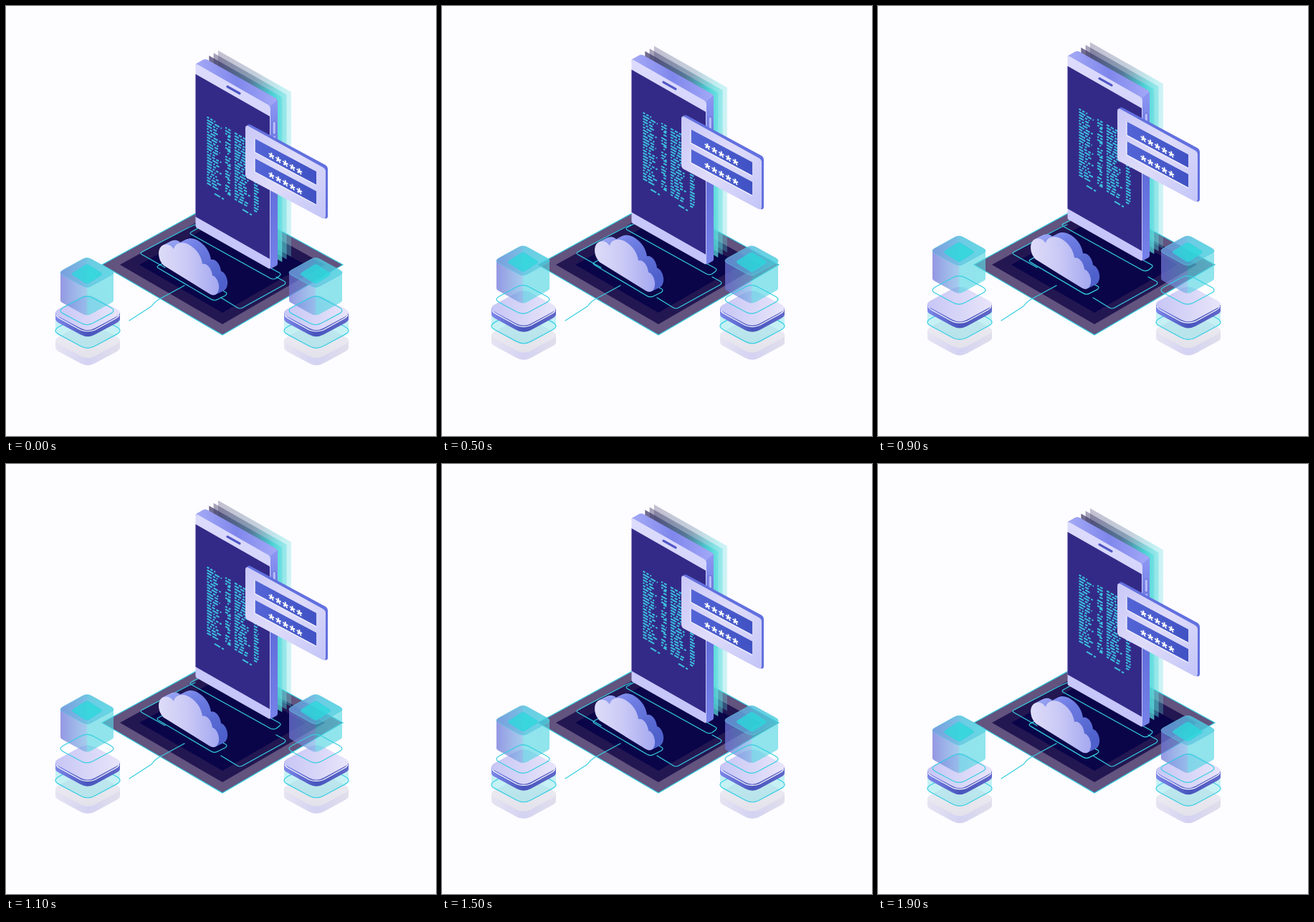
Animation, 600 px wide and 600 px high, one loop 2 s. Source, as an HTML page:

```html
<!DOCTYPE html>
<html lang="en">
<head>
<meta charset="utf-8">
<title>Isometric cloud access</title>
<style>
  html, body { margin: 0; width: 100%; height: 100%; overflow: hidden; background: #fdfcff; }
  svg { display: block; width: 100vw; height: 100vh; }
  .line { fill: none; stroke: #35cfe2; stroke-width: 1.2; stroke-linejoin: round; stroke-linecap: round; }
  .stars { font: bold 21px "Liberation Sans", Arial, sans-serif; letter-spacing: 1.55px; fill: #fff; }
</style>
</head>
<body>
<svg id="stage" viewBox="0 0 600 600" xmlns="http://www.w3.org/2000/svg"></svg>
<script>
const PERIOD = 2000, STEP = 100, LEAD = 25;
const stage = document.getElementById('stage');
const path = (d, attrs) => `<path d="${d}" ${attrs}/>`;
const poly = (points, attrs) => `<polygon points="${points}" ${attrs}/>`;
const lift = (amp, body) => `<g data-lift="${amp}">${body}</g>`;
const gradient = (id, direction, ...stops) =>
  `<linearGradient id="${id}" ${direction}>${stops.map(([at, color, alpha = 1]) =>
    `<stop offset="${at}" stop-color="${color}" stop-opacity="${alpha}"/>`).join('')}</linearGradient>`;
const DOWN = 'x1="0" y1="0" x2="0" y2="1"';
const DIAGONAL = 'x1="0" y1="0" x2="1" y2="1"';

// Rhombus with softened corners, centred on (cx, cy).
function tile(cx, cy, hw, hh, soft = .2) {
  const corners = [[cx, cy - hh], [cx + hw, cy], [cx, cy + hh], [cx - hw, cy]];
  const toward = (a, b) => [a[0] + (b[0] - a[0]) * soft, a[1] + (b[1] - a[1]) * soft];
  return corners.map((corner, i) => {
    const before = toward(corner, corners[(i + 3) % 4]);
    const after = toward(corner, corners[(i + 1) % 4]);
    return `${i ? 'L' : 'M'}${before}Q${corner} ${after}`;
  }).join('') + 'Z';
}

// Silhouette of a tile pulled down by a height.
function block(cx, cy, hw, hh, height, soft = .2) {
  const reach = hw * (1 - soft / 2);
  return tile(cx, cy, hw, hh, soft) + tile(cx, cy + height, hw, hh, soft) +
    `M${cx - reach},${cy}h${2 * reach}v${height}h${-2 * reach}Z`;
}

function seeded(seed) {
  return () => (seed = (seed * 16807) % 2147483647) / 2147483647;
}

function defs() {
  return '<defs>' +
    gradient('bezelTop', '', [0, '#a5aaf6'], [.5, '#7f87ec'], [1, '#a4a9f7']) +
    gradient('bezel', DOWN, [0, '#dddcfd'], [.3, '#d3d3fc'], [1, '#c3c3fa']) +
    gradient('phoneSide', DOWN, [0, '#8f98f3'], [.4, '#5d69d8'], [1, '#7681e8']) +
    gradient('ghost', '', [0, '#3b3163'], [.55, '#40688c'], [.86, '#35d0d2'], [1, '#66dfe0']) +
    gradient('card', DIAGONAL, [0, '#c9c8f8'], [.5, '#dfdcfa'], [1, '#c3c5f8']) +
    gradient('field', '', [0, '#5365d6'], [1, '#4052c3']) +
    gradient('cloudFront', '', [0, '#dddcf8'], [.45, '#cbcaf6'], [1, '#a4a8f0']) +
    gradient('cloudBack', '', [0, '#a3adf5'], [.5, '#7483e7'], [1, '#4d5fca']) +
    gradient('cubeSide', '', [0, '#6f74d8', .74], [.48, '#6fabe2', .62], [.52, '#4bd3e0', .6], [1, '#58d8e2', .66]) +
    gradient('cubeTop', '', [0, '#6c9fdc', .62], [1, '#3fcfdd', .55]) +
    gradient('slabTop', '', [0, '#c7c6f5'], [1, '#e8e5fa']) +
    gradient('slabSide', '', [0, '#7d87ea'], [.5, '#4855bd'], [1, '#6168ca']) +
    gradient('echoSide', '', [0, '#e6e4f2'], [.5, '#d3d2f2'], [1, '#e1dfeb']) +
    gradient('echoTop', DOWN, [0, '#f0eef5'], [1, '#e3e1ea']) +
    '</defs>';
}

function base() {
  return poly('302,269 470,361 302,459 134,361', 'fill="#62537f" stroke="#35cfe2" stroke-width="1.2"') +
    poly('302,282 445,361 302,444 159,361', 'fill="#231752"') +
    poly('302,297 418,361 302,428 186,361', 'fill="#0a0549"') +
    path('M264,305L255,309 190,343Q186,345 190,347L222,365', 'class="line"') +
    path('M300,407L323,421Q326,423 330,421L388,389Q392,386 388,384L377,378', 'class="line"') +
    path('M172,439L203,419Q208,412 214,409L249,390', 'class="line"');
}

function code() {
  const random = seeded(77);
  const slope = .577;
  let d = '';
  const dash = (x, y, length) => d += `M${x},${y}l${length},${length * slope}`;
  const row = (left, right, top) => {
    let x = left;
    while (x < right - 1) {
      const length = Math.min(right - x, 2 + random() * 7);
      dash(x, top + (x - left) * slope, length);
      x += length + 1.8;
    }
  };
  for (let i = 0; i < 24; i++) {
    const y = 155 + i * 4;
    row(280.5, 292 + random() * 9, y);
    row(306 + (i % 5 > 2 ? 3 : 0), 313.5, y + 14.7);
    row(319, 332 + random() * 9, y + 22.2);
    row(346, 352.5, y + 38);
  }
  dash(291, 262, 8); dash(301, 268, 3);
  dash(330, 284, 8); dash(340, 290, 3);
  return path(d, 'fill="none" stroke="#3cbfdd" stroke-width="2"');
}

function phone() {
  const ghosts = [3, 2, 1].map(n => {
    const x = 6.3 * n, y = -3.7 * n;
    return poly(`${277 + x},${73 + y} ${379 + x},${131 + y} ${379 + x},${361 + y} ${277 + x},${303 + y}`,
      `fill="url(#ghost)" opacity="${[0, .72, .45, .3][n]}"`);
  }).join('');
  return path('M270,309L259,315Q255,317 259,319L369,380Q373,382 377,380L381,377Q385,374 381,372L370,366', 'class="line"') +
    ghosts +
    path('M264.500,83Q264.500,80 268,79L275,75Q278,73.500 281,75L377,129Q379,131 379,134L369,141Z', 'fill="url(#bezelTop)"') +
    path('M368,142Q369,138 379,131V359Q379,362 376,363L369,367Z', 'fill="url(#phoneSide)"') +
    path('M264.500,83Q264.500,80 268,82L366,138Q369,140 369,143V365Q369,368 366,366L267,310Q264.500,309 264.500,307Z', 'fill="url(#bezel)"') +
    poly('264.5,95 368,154 368,353 264.5,294', 'fill="#332a87"') +
    path('M309,112.500L326,122', 'fill="none" stroke="#5056c6" stroke-width="3.2" stroke-linecap="round"') +
    path('M374.300,163V177', 'fill="none" stroke="#666fd8" stroke-width="5.500" stroke-linecap="round"') +
    path('M374.300,163V177M374.300,183V184', 'fill="none" stroke="#b5b9fa" stroke-width="3.500" stroke-linecap="round"') +
    code();
}

function card() {
  const field = y => path(`M347,${y}L433,${y + 46}V${y + 65}L347,${y + 19}Z`, 'fill="url(#field)"') +
    path(`M347,${y}V${y + 19}L433,${y + 65}`, 'fill="none" stroke="#f4f2ff" stroke-width="1.3"') +
    `<text class="stars" transform="matrix(1 .56 0 1 366.3 ${y + 32})">*****</text>`;
  return path('M336,167Q338,164 342,166L446,222Q449,224 449,228V293Q449,298 444,296L440,230Z', 'fill="#6270df"') +
    path('M334,171Q334,165 339,168L442,225Q446,227 446,231V292Q446,298 441,296L338,241Q334,239 334,235Z', 'fill="url(#card)"') +
    field(185) + field(212.5);
}

function cloud() {
  const shape = 'M220,362C210,352 211,334 222,333C227,332 231,335 234,339C237,329 248,328 257,334' +
    'C268,341 273,351 274,360C280,358 287,366 288,376C293,377 298,386 297,394C296,403 290,406 283,401Z';
  let body = '';
  for (let i = 12; i > 0; i--) body += path(shape, `fill="url(#cloudBack)" transform="translate(${i},${-i / 2})"`);
  return path('M219,359L213,362Q209,364 213,366L286,409Q291,412 296,409L306,404Q310,401 306,399L300,396', 'class="line"') +
    body + path(shape, 'fill="url(#cloudFront)"');
}

function stack(x) {
  const cx = 114, cube = 113;
  return `<g transform="translate(${x})">` +
    lift(14, path(block(cx, 467, 50, 27, 10), 'fill="url(#echoSide)"') +
      path(tile(cx, 467, 50, 27), 'fill="url(#echoTop)"')) +
    lift(12, path(block(cx, 437, 50, 27, 16), 'fill="#77e1e6" fill-opacity=".42"') +
      path(tile(cx, 453, 50, 27), 'class="line"') +
      path(block(cx, 429, 50, 27, 8), 'fill="url(#slabSide)"') +
      path(tile(cx, 428, 50, 27), 'fill="url(#slabTop)"') +
      path('M70,431Q71,434 75,436L104,452Q114,456 124,452L153,436Q157,434 158,431', 'fill="none" stroke="#fff" stroke-width="1.2"')) +
    lift(31, path(block(cube, 372, 40, 22, 39, .15), 'fill="url(#cubeSide)"') +
      path(tile(cube, 372, 40, 22, .15), 'fill="url(#cubeTop)" stroke="#59c7df" stroke-width=".7"') +
      path(tile(cube, 374, 22, 14, .12), 'fill="#28dadb" fill-opacity=".75" stroke="#35cfe2" stroke-width=".8"')) +
    lift(29, path(tile(cube, 425, 41, 22), 'class="line"')) +
    '</g>';
}

stage.innerHTML = defs() + base() + lift(11.5, phone()) + lift(24, card()) +
  lift(8.5, cloud()) + stack(0) + stack(319);

const movers = [...stage.querySelectorAll('[data-lift]')];
function draw(now) {
  const time = Math.floor((now % PERIOD) / STEP) * STEP + LEAD;
  const rise = (1 - Math.cos(2 * Math.PI * time / PERIOD)) / 2;
  for (const mover of movers) {
    mover.setAttribute('transform', `translate(0 ${(-mover.dataset.lift * rise).toFixed(2)})`);
  }
}
const start = performance.now();
function tick() {
  draw(performance.now() - start);
  requestAnimationFrame(tick);
}
tick();
</script>
</body>
</html>
```
